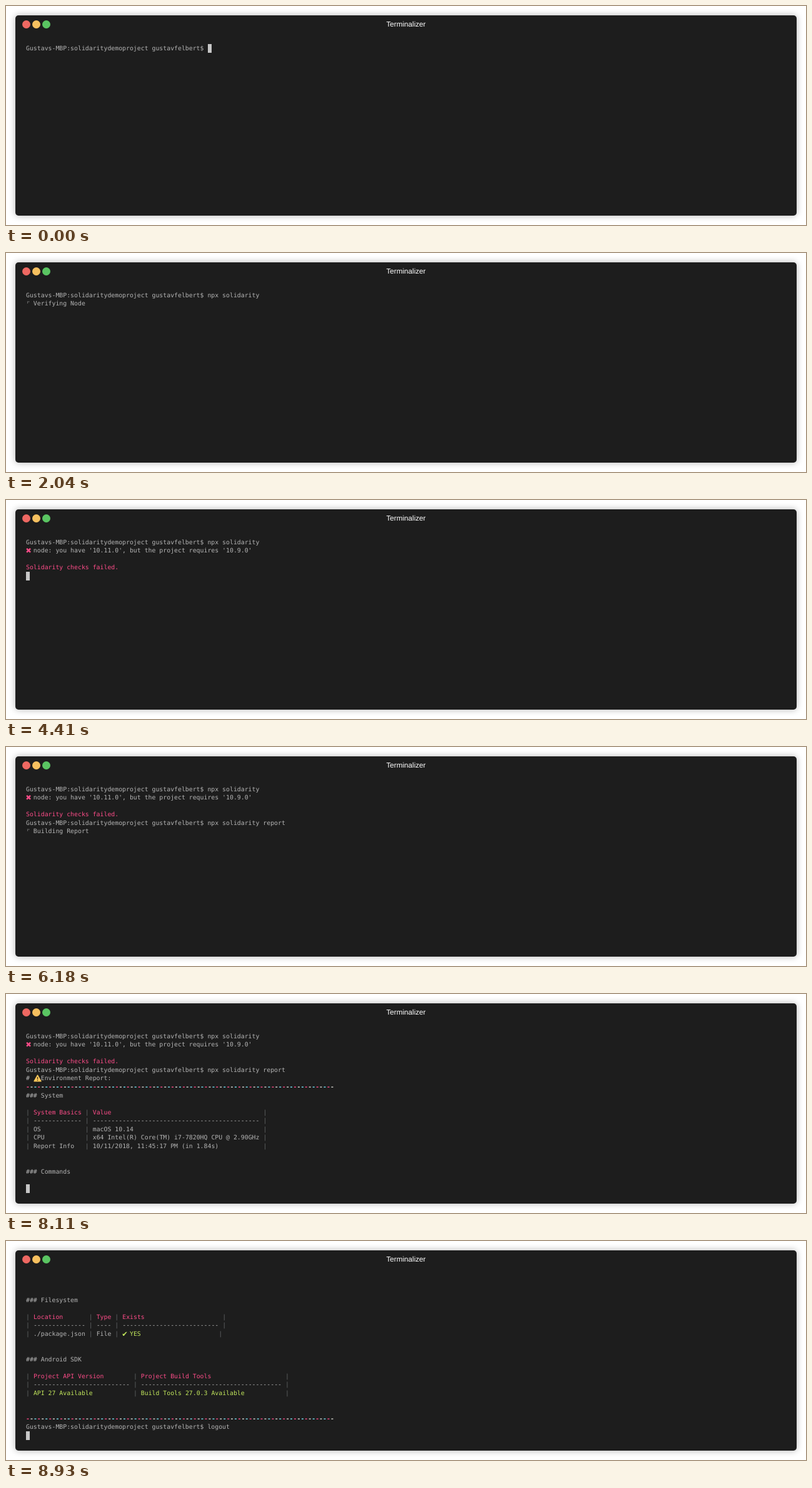
Animation of 1280 by 351 pixels, one loop 9.2 s. Source, as an HTML page:

```html
<!DOCTYPE html>
<html lang="en">
<head>
<meta charset="utf-8">
<title>Terminal</title>
<style>
  html, body { margin: 0; width: 100%; height: 100%; overflow: hidden; background: #fff; }
  #stage { position: relative; width: 1280px; height: 351px; overflow: hidden; }
  #win {
    position: absolute; left: 15px; top: 15px; width: 1250px; height: 321px;
    border-radius: 5px; background: #1d1d1d; box-shadow: 0 0 11px rgba(0, 0, 0, .3);
  }
  #win i { position: absolute; top: 8px; width: 13px; height: 13px; border-radius: 50%; }
  #title {
    position: absolute; left: 0; right: 0; top: 8px; text-align: center; color: #fff;
    font: 11.7px/14px "Liberation Sans", Arial, sans-serif; text-rendering: geometricPrecision;
  }
  #term {
    position: absolute; left: 32px; top: 61px; color: #b4b4b4; white-space: pre;
    font: 9.86px/13.56px "DejaVu Sans Mono", monospace; text-rendering: geometricPrecision;
    font-variant-ligatures: none;
  }
  #term div { position: absolute; left: 0; height: 13.56px; }
  #term .line { margin-top: .6px; }
  .red { color: #fc4c88; }
  .green { color: #c2e75c; }
  .white { color: #d5d5d0; }
  .blue { color: #75dff2; }
  .dim { color: #626566; }
  .rule { font-weight: bold; }
  .cell {
    display: inline-block; width: 5.936px; height: 13.56px; vertical-align: top;
    font-family: "DejaVu Sans", sans-serif;
  }
  .mark { font-size: 11.5px; font-weight: bold; text-indent: -.8px; }
  .dots { font-size: 7px; text-indent: 1px; }
  .warn { width: 11.872px; }
  .warn svg { display: block; margin: -.6px 0 0 -.3px; }
  #cursor { width: 6px; background: #c7c7c7; }
</style>
</head>
<body>
<div id="stage">
  <div id="win">
    <i style="left:11px;background:#ee6862"></i>
    <i style="left:27px;background:#f6c05f"></i>
    <i style="left:43px;background:#5ac562"></i>
    <div id="title">Terminalizer</div>
  </div>
  <div id="term"></div>
</div>
<script>
const LOOP = 9200, CELL = 5.936, ROW = 13.56;
const term = document.getElementById('term');

const paint = (style, text) => `<span class="${style}">${text}</span>`;
const glyph = (kind, char) => paint('cell ' + kind, char);
const blank = n => Array(n).fill('');

// Table rows: each cell is padded to its column width, then coloured.
const bar = paint('dim', '|');
const row = (widths, cells, color = '') =>
  bar + cells.map((c, i) => ' ' + paint(color, c.padEnd(widths[i])) + ' ' + bar).join('');
const table = (widths, head, body, color) => [
  row(widths, head, 'red'),
  row(widths, widths.map(w => '-'.repeat(w))),
  ...body.map(cells => row(widths, cells, color))
];

const prompt = 'Gustavs-MBP:solidaritydemoproject gustavfelbert$ ';
const check = prompt + 'npx solidarity';
const report = check + ' report';
const spin = (char, text) => glyph('dots', char) + ' ' + text;

const stripes = ['red', 'white', 'blue'];
const rule = paint('rule', Array.from({ length: 83 }, (_, i) => paint(stripes[i % 3], '-')).join(''));
const warn = glyph('warn', `<svg width="13" height="12" viewBox="0 0 13 12">
<path d="M6.5 1.2 12 10.8H1Z" fill="#fcc85a" stroke="#fcc85a" stroke-width="1.4" stroke-linejoin="round"/>
<path d="M6.5 4v3.6M6.5 8.8v1.3" stroke="#3a2f1c" stroke-width="1.4"/></svg>`);

const mismatch = [check, glyph('mark red', '✖') + " node: you have '10.11.0', but the project requires '10.9.0'"];
const failed = [...mismatch, '', paint('red', 'Solidarity checks failed.')];
const asked = [...failed, report];
const headed = [...asked, `# ${warn}Environment Report:`];
const ruled = [...headed, rule, '### System', ''];
const system = [...ruled, ...table([13, 45], ['System Basics', 'Value'], [
  ['OS', 'macOS 10.14'],
  ['CPU', 'x64 Intel(R) Core(TM) i7-7820HQ CPU @ 2.90GHz'],
  ['Report Info', '10/11/2018, 11:45:17 PM (in 1.84s)']
])];

const files = table([14, 4, 26], ['Location', 'Type', 'Exists'], []);
files.push(`${bar} ./package.json ${bar} File ${bar} ` +
  paint('green', glyph('mark', '✔') + ' YES'.padEnd(24)) + ' ' + bar);
const summary = [
  ...blank(2), '### Filesystem', '', ...files, ...blank(2),
  '### Android SDK', '',
  ...table([26, 38], ['Project API Version', 'Project Build Tools'],
    [['API 27 Available', 'Build Tools 27.0.3 Available']], 'green'),
  ...blank(2), rule
];

// Start time, lines, cursor column on the last line (-1 hides the cursor).
const steps = [
  [0, [prompt], 49],
  [300, [check], 63],
  [1260, [check, ''], 0],
  [1840, [check, spin('⠋', 'Verifying Node')], -1],
  [3530, [check, spin('⠋', 'Verifying Xcode')], -1],
  [3730, [check, spin('⠙', 'Verifying Node')], -1],
  [4130, [...mismatch, ''], 0],
  [4310, [...mismatch, '', ''], 0],
  [4410, [...failed, ''], 0],
  [4510, [...failed, prompt], 49],
  [4910, asked, 70],
  [5590, [...asked, ''], 0],
  [6180, [...asked, spin('⠋', 'Building Report')], -1],
  [7680, [...asked, ''], 0],
  [7710, [...headed, ''], 0],
  [7810, [...headed, rule, ''], 0],
  [7910, [...ruled, ''], 0],
  [8010, [...system, ''], 0],
  [8110, [...system, ...blank(2), '### Commands', '', ''], 0],
  [8210, ['', ...summary, ''], 0],
  [8310, ['', ...summary, prompt], 49],
  [8930, [...summary, prompt + 'logout', ''], 0]
];

function show([, lines, col]) {
  const block = col < 0 ? '' :
    `<div id="cursor" style="left:${col * CELL}px;top:${(lines.length - 1) * ROW}px"></div>`;
  term.innerHTML = block +
    lines.map((text, i) => `<div class="line" style="top:${i * ROW}px">${text}</div>`).join('');
}

let shown = null;
function tick() {
  const t = performance.now() % LOOP;
  const step = steps.filter(s => s[0] <= t).pop();
  if (step !== shown) show(shown = step);
  requestAnimationFrame(tick);
}
tick();
</script>
</body>
</html>
```
